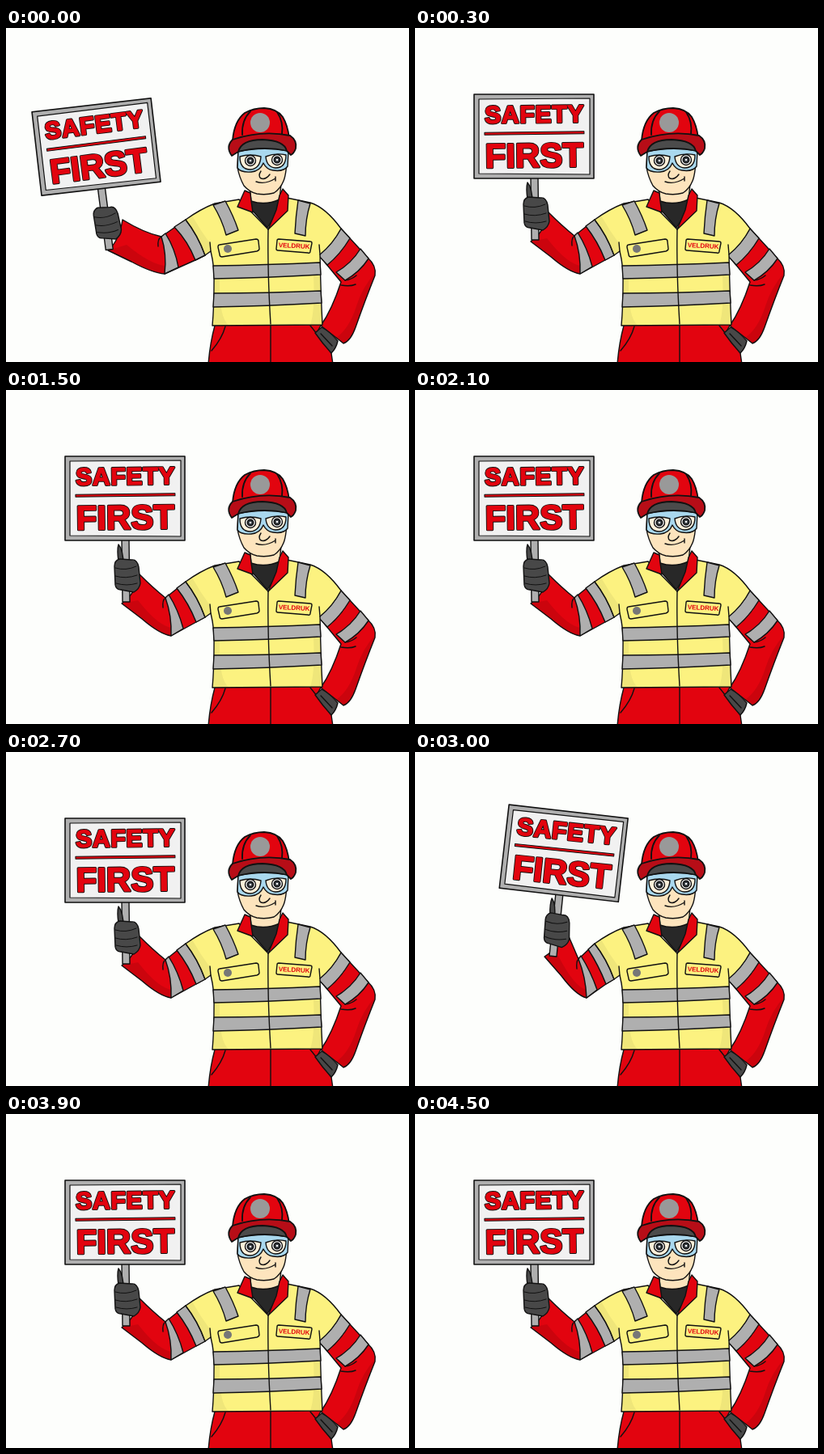
Recreate the animation shown at these times as an HTML page. Size 498 by 413 pixels, loop 4800 ms.

```html
<!DOCTYPE html>
<html lang="en">
<head>
<meta charset="utf-8">
<title>Safety first</title>
<style>
  html, body { margin: 0; width: 100%; height: 100%; overflow: hidden; background: #fdfefc; }
  svg { display: block; width: 498px; height: 413px; }
  .line { fill: none; }
  .red { fill: #e2040f; }
  .dark-red { fill: #b70d17; }
  .yellow { fill: #fcf280; }
  .grey { fill: #afafaf; }
  .glove { fill: #484848; }
  .skin { fill: #fde4bd; }
  .blue { fill: #a9d8ee; }
  .shade { fill: #000; opacity: .1; stroke: none; }
  .soft { opacity: .05; }
  text { font-family: "Liberation Sans", Arial, sans-serif; font-weight: bold; text-anchor: middle; }
</style>
</head>
<body>
<svg viewBox="0 0 498 413" stroke="#111" stroke-width="1.4" stroke-linejoin="round" stroke-linecap="round">
  <!-- trousers -->
  <path class="red" d="M256 364L391 364L384 377L402 402L404 416H250Q252 390 258 368Z"/>
  <path class="line" d="M271 369Q267 384 254 399M376 368L384 378L402 401M327 366V414"/>

  <!-- arm on the hip -->
  <path class="red" d="M414 248L447 284Q458 294 456 306Q444 336 432 370Q426 387 417 390L389 368Q403 348 414 314L386 280Z"/>
  <path class="shade" d="M456 303Q444 336 432 370Q426 387 417 390L408 383Q424 372 433 344Q440 321 456 303Z"/>
  <path class="grey" d="M414 248L425 260Q413 280 397 293L386 281Q403 268 414 248Z"/>
  <path class="grey" d="M438 273L448 285Q437 302 419 312L408 302Q427 291 438 273Z"/>
  <path class="line" d="M419 312Q427 311 433 306M414 318Q425 320 432 317"/>
  <path class="glove" d="M382 377L390 370Q401 376 410 387Q408 396 402 402Q391 390 382 377Z"/>
  <path class="line" d="M389 378L403 393"/>

  <g id="sleeve"></g>

  <!-- vest -->
  <path class="yellow" d="M288 212L258 217Q240 224 222 237Q237 256 246 281L253 276Q258 296 257 318Q257 345 255 368L391 367Q389 330 388 280Q404 267 414 248Q395 222 376 216L347 210L324 249Z"/>
  <path class="shade soft" d="M222 237Q237 256 246 281L253 276L252 266Q240 250 230 232ZM257 346L255 368L276 368Q263 360 264 310L257 310ZM389 341L391 367L376 367Q382 350 380 306L388 305Z"/>
  <path class="grey" d="M256 219L271 214Q281 232 287 250L272 256Q267 237 256 219Z"/>
  <path class="grey" d="M361 213L376 217Q370 236 370 257L357 254Q358 233 361 213Z"/>
  <path class="grey" d="M256 294Q320 293 388 290L389 305Q322 309 257 310Z"/>
  <path class="grey" d="M257 328Q322 328 389 325L390 340Q322 344 256 345Z"/>
  <path class="line" d="M324 249Q323 300 327 366M253 276L252 265M388 280L387 268"/>
  <path class="yellow" d="M264 268L309 261Q312 261 312 264L313 273Q313 275 310 276L267 283Q264 283 264 280L262 271Q262 268 264 268Z"/>
  <circle cx="274" cy="273" r="5" fill="#777" stroke="none"/>
  <path class="yellow" d="M337 261L376 264Q378 264 378 266L376 276Q376 279 373 278L336 275Q334 275 334 273L335 263Q335 261 337 261Z"/>
  <text class="red" transform="translate(356 272) rotate(3)" font-size="8" stroke="none">VELDRUK</text>

  <!-- neck, shirt and collar -->
  <path fill="#282828" d="M302 212H340L336 226L323 247L304 225Z"/>
  <path class="skin" d="M301 196L303 214Q320 220 338 212L340 193Z"/>
  <path class="red" d="M295 201L286 221L305 228L303 214L302 204Z"/>
  <path class="red" d="M342 199L349 207L348 226L324 249L334 225L338 207Z"/>

  <!-- head -->
  <path class="skin" d="M287 147L286 172Q288 184 294 195Q301 203 310 205Q321 207 331 204Q339 199 343 189Q347 180 348 147Z"/>
  <path class="line" d="M315 177Q311 183 315 186Q321 188 326 181M309 190Q320 194 333 186M333 184V189"/>
  <path class="blue" d="M287 153Q317 146 349 152L348 171Q343 178 330 176Q322 175 318 167Q314 177 303 178Q290 179 286 173Z"/>
  <path fill="#fdf0da" d="M289 159Q302 155 315 159Q314 174 302 175Q289 175 289 159ZM321 159Q333 154 346 157Q346 173 333 173Q322 172 321 159Z"/>
  <g id="eyes"></g>
  <path fill="#4b4b4b" d="M286 153Q287 138 317 137Q346 137 348 152Q317 145 286 153Z"/>
  <g stroke-width="1.8">
    <path class="red" d="M280 139Q282 115 295 105Q306 99 319 99Q335 100 342 110Q348 120 350 136Q317 126 280 139Z"/>
    <path class="dark-red" d="M280 138Q316 126 351 133Q360 139 358 149Q356 155 352 157L347 152Q344 139 317 138Q291 138 287 153L279 158Q271 147 280 138Z"/>
    <path class="line" d="M292 132Q291 114 302 103M341 131Q343 116 335 104"/>
  </g>
  <circle cx="314" cy="117" r="12" fill="#999" stroke="none"/>

  <!-- sign and the hand holding it -->
  <g id="sign">
    <path class="grey" d="M143 185H152L153 262H144Z"/>
    <path class="grey" stroke-width="1.6" d="M73 82H221V186H73Z"/>
    <path fill="#f1f1f1" stroke-width="1.2" d="M79 88L216 87V181L79 180Z"/>
    <g class="red" transform="rotate(-.7 147 134)">
      <path d="M86 128.5H209V131.5H86Z" stroke-width="1"/>
      <g id="slogan" stroke-width="3.2">
        <text x="148" y="117" font-size="30" letter-spacing=".8">SAFETY</text>
        <text x="147" y="172" font-size="42">FIRST</text>
      </g>
      <g id="sloganFace" stroke="#e2040f" stroke-width="1.4"></g>
    </g>
    <path class="glove" id="thumb" d="M139 191Q137 198 139 212L145 216Q145 198 139 191Z"/>
    <path class="glove" d="M140 209Q134 211 134 218L135 241Q136 247 142 247L158 250Q165 246 166 239L164 219Q162 209 155 210Z"/>
    <path class="line" stroke-width="1" d="M135 220Q148 224 161 218M135 230Q148 234 162 229M136 239Q149 243 162 239"/>
  </g>
</svg>
<script>
const STEP_MS = 300;
const SWING = [-1, 0, 1, 0];
const TILT = 6.6;
const get = id => document.getElementById(id);
const sign = get('sign'), sleeve = get('sleeve'), thumb = get('thumb');

// The red face of the letters sits on their black outline.
for (const word of get('slogan').children) {
  get('sloganFace').append(word.cloneNode(true));
}

get('eyes').innerHTML = [[302, 164], [335, 163]].map(([x, y]) => `
  <circle cx="${x}" cy="${y}" r="6.5" fill="#fff"/>
  <circle cx="${x}" cy="${y}" r="3.8" fill="#30363c"/>
  <circle cx="${x}" cy="${y}" r="1.3" fill="#fff" stroke="none"/>`).join('');

// Points slide with the swing; those near the shoulder barely move.
function drawSleeve(swing) {
  const at = (x, y, dx, dy) => `${x + swing * dx} ${y + swing * dy}`;
  const cuffTop = at(165, 228, 21, -9), cuffBottom = at(143, 264, 17, -11);
  const outerTop = at(197, 257, 5, -1), outerBottom = at(204, 304, 8, 0);
  const midTop = at(201, 253, 4, -1), midBottom = at(219, 295, 6, -1);
  const innerTop = at(211, 245, 3, -1), innerBottom = at(235, 287, 1, 0);
  const elbow = at(190, 302, 9, -1), forearm = at(168, 283, 13, -6);
  const upper = at(182, 245, 12, -8);
  const outer = at(205, 279, 6, -1), mid = at(213, 272, 4, -1), inner = at(226, 264, 1, 0);
  sleeve.innerHTML = `
    <path class="red" d="M${cuffTop}Q${upper} ${outerTop}L222 237Q237 256 246 281L${innerBottom}L${outerBottom}
      Q${elbow} ${forearm}L${cuffBottom}Q${at(160, 252, 20, -11)} ${cuffTop}Z"/>
    <path class="shade" d="M${cuffBottom}L${forearm}Q${elbow} ${outerBottom}L${at(205, 294, 7, 0)}
      Q${at(188, 292, 9, -1)} ${at(163, 260, 14, -8)}Z"/>
    <path class="grey" d="M${outerTop}L${midTop}Q${mid} ${midBottom}L${outerBottom}Q${outer} ${outerTop}Z"/>
    <path class="grey" d="M${innerTop}L222 237Q237 256 246 281L${innerBottom}Q${inner} ${innerTop}Z"/>
    <path class="line" d="M${outerTop}Q${at(193, 260, 6, -1)} ${at(194, 269, 6, -1)}"/>`;
}

let shown = null;
function render() {
  const swing = SWING[Math.floor(performance.now() / STEP_MS) % SWING.length];
  if (swing !== shown) {
    shown = swing;
    sign.setAttribute('transform', `rotate(${swing * TILT} 242 448)`);
    // The thumb folds into the fist on the outward swing.
    thumb.setAttribute('transform', `translate(0 ${swing < 0 ? 18 : 0})`);
    drawSleeve(swing);
  }
  requestAnimationFrame(render);
}
render();
</script>
</body>
</html>
```
